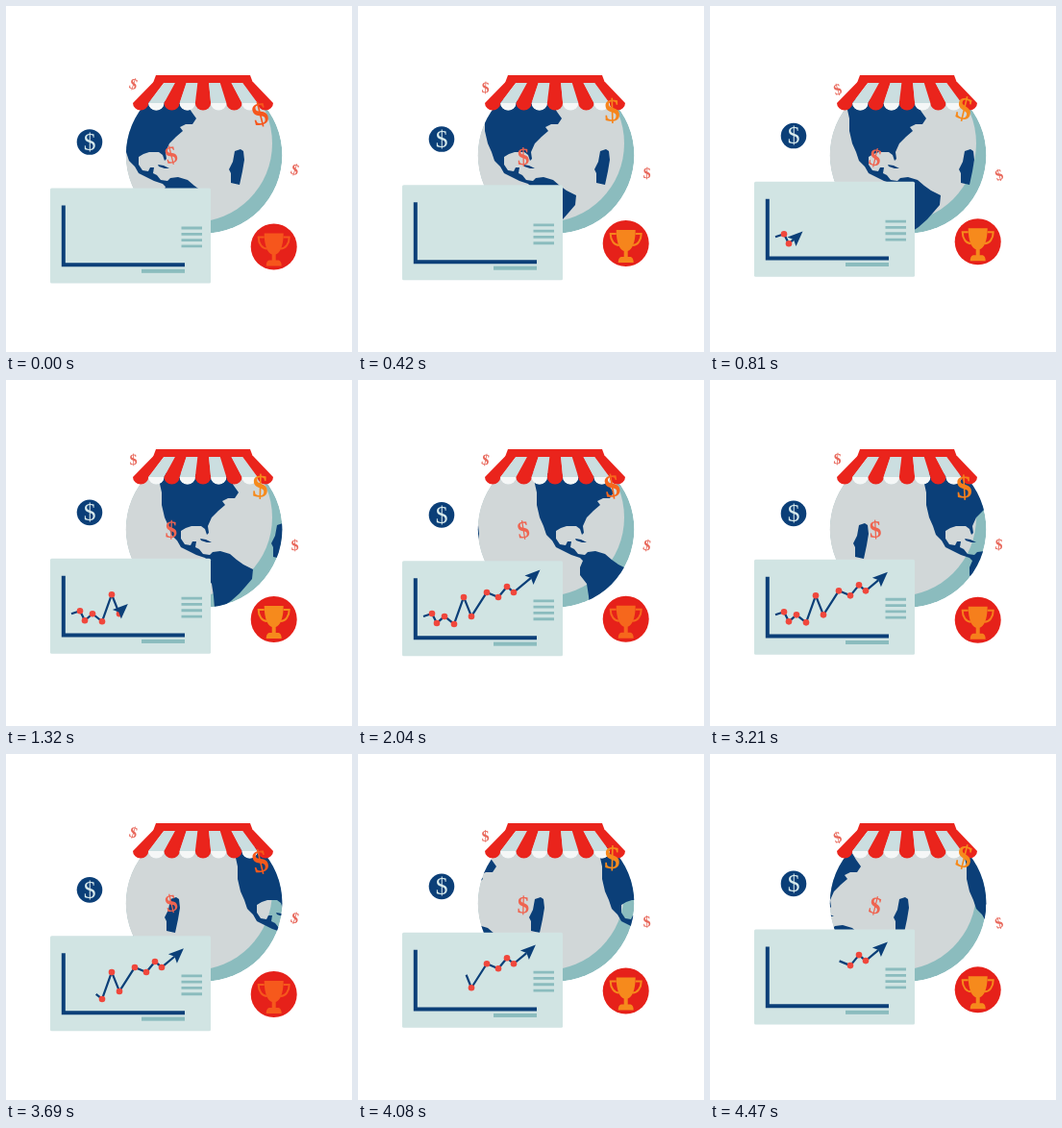
An HTML page that plays this animation: 360x360 px, repeating every 4.5 s.

```html
<!DOCTYPE html>
<html lang="en">
<head>
<meta charset="utf-8">
<title>Global store growth</title>
<style>
  html, body { margin: 0; width: 100%; height: 100%; overflow: hidden; background: #fff; }
  svg { display: block; width: 100vw; height: 100vh; }
  text { font-family: "Liberation Serif", "Noto Serif", serif; text-anchor: middle; }
  .ink { fill: #0b3f78; }
  .teal { fill: #8bbcbe; }
</style>
</head>
<body>
<svg viewBox="0 0 360 360">
  <defs>
    <clipPath id="disc"><circle cx="206.1" cy="155.200" r="81.300"/></clipPath>
    <g id="land">
      <path d="M113 96 L116 108 118 117 118 130 121 143 125 152 128 161 134 167 138 174 146 178 154 182 163 185 166 188
        163 195 163 203 170 212 172 225 173 238 181 236 190 230 199 222 206 214 212 207 213 197 203 192 196 187
        189 181 179 178 171 179 168 182 161 181 157 176 153 174 154 168 150 168 148 172 142 171 138 165 138 157
        143 154 149 152 159 152 163 155 165 161 167 159 166 152 170 143 177 136 184 130 181 126 187 123 194 123
        198 117 193 110 187 100Z"/>
      <path d="M158 165l6 1 6 3-5 0-6-2Z"/>
      <path d="M238 151l6-2 3 2 1 9-2 12-3 14-9-2 0-10-2-4 4-8Z"/>
    </g>
  </defs>

  <g clip-path="url(#disc)">
    <circle class="teal" cx="206.1" cy="155.200" r="81.300"/>
    <circle cx="195" cy="143" r="82" fill="#d1d7d8"/>
    <g id="strip" class="ink"><use href="#land"/><use href="#land" x="-190"/></g>
  </g>
  <g id="awning"></g>

  <g id="card">
    <rect x="46" width="167" height="99" rx="1.5" fill="#d1e4e3"/>
    <path d="M59.8 18V79.800H186" fill="none" stroke="#0b3f78" stroke-width="4"/>
    <rect class="teal" x="141" y="84.300" width="45" height="4"/>
    <path d="M182.500 41.500h21.500m-21.500 6.300h21.500m-21.500 6.300h21.500m-21.500 6.300h21.500" stroke="#8bbcbe" stroke-width="2.800"/>
    <g transform="translate(0 .6)">
      <polyline id="line" fill="none" stroke="#0b3f78" stroke-width="2.200" stroke-linejoin="round"/>
      <g id="dots" fill="#f0473c"></g>
      <path id="head" class="ink" d="M9.500 -8.500 L2.500 7 0 0 -6.500 -2.500Z"/>
    </g>
  </g>

  <g id="badge"><circle class="ink" r="13.300"/></g>
  <g id="prize">
    <circle r="24" fill="#e6211a"/>
    <g id="cup">
      <path d="M-10 -14H10C10 0 6 7 2 8V14H5Q8 15 8 20H-8Q-8 15 -5 14H-2V8C-6 7 -10 0 -10 -14Z"/>
      <path d="M-10 -10H-16C-16 -3 -12 2 -7 2M10 -10H16C16 -3 12 2 7 2" fill="none" stroke="currentColor" stroke-width="2"/>
    </g>
  </g>
  <g id="coins"></g>
</svg>
<script>
const LOOP = 4500, STEP = 30, BOB = 1800, LEAD = 130;
const $ = id => document.getElementById(id);

function add(parent, tag, attrs, text) {
  const el = document.createElementNS('http://www.w3.org/2000/svg', tag);
  for (const k in attrs) el.setAttribute(k, attrs[k]);
  if (text) el.textContent = text;
  return parent.appendChild(el);
}
const move = (el, x, y, turn = 0) =>
  el.setAttribute('transform', `translate(${x} ${y}) rotate(${turn})`);
const dollar = (parent, size, fill, weight = 400) =>
  add(parent, 'text', { y: size * 0.32, 'font-size': size, 'font-weight': weight, fill }, '$');

// Striped awning with scalloped flaps
const topX = i => 153.5 + i * 103.5 / 9, lowX = i => 132 + i * 146 / 9;
for (let i = 0; i < 9; i++) {
  const red = i % 2 === 0, a = lowX(i), b = lowX(i + 1);
  const flap = `A8.1 7.5 0 0 1 ${a} 101`;
  add($('awning'), 'path', {
    d: `M${topX(i)} 79H${topX(i + 1)}L${b} 101${flap}Z`, fill: red ? '#ea241c' : '#cbdee0'
  });
  if (!red) add($('awning'), 'path', { d: `M${a} 101H${b}${flap}Z`, fill: '#f5f7f7' });
}
add($('awning'), 'path', { d: 'M156 72H254L257 80H153Z', fill: '#ea241c' });

// Chart, in card coordinates
const pts = [[68, 57], [77, 54], [82, 64], [90, 57], [100, 65], [110, 37], [118, 57],
  [134, 32], [146, 37], [155, 26], [162, 32], [180, 17]];
const at = [0];
for (let i = 1; i < pts.length; i++)
  at[i] = at[i - 1] + Math.hypot(pts[i][0] - pts[i - 1][0], pts[i][1] - pts[i - 1][1]);
const total = at[at.length - 1];
$('line').setAttribute('points', pts.join(' '));
const dots = pts.slice(1, -1).map(([cx, cy]) => add($('dots'), 'circle', { cx, cy, r: 3.3 }));

function pointAt(len) {
  let i = 1;
  while (i < at.length - 1 && at[i] < len) i++;
  const k = (len - at[i - 1]) / (at[i] - at[i - 1]);
  return [0, 1].map(n => pts[i - 1][n] + k * (pts[i][n] - pts[i - 1][n]));
}

dollar($('badge'), 25.5, '#d9ebec');

// x, middle y, bob, turn, size, colour
const coins = [
  [132.7, 84, -3, 18, 16, '#e8675a'],
  [300.7, 173, -3, 18, 16, '#e8675a'],
  [172, 156.5, -1.5, -14, 25, '#ef6450'],
  [264.5, 110, 3, -14, 33, 'currentColor']
].map(([x, y, bob, turn, size, fill]) => {
  const g = add($('coins'), 'g', {});
  dollar(g, size, fill, 700);
  return { g, x, y, bob, turn };
});

const clamp = (v, max = total) => Math.min(max, Math.max(0, v));
const wave = t => Math.cos(2 * Math.PI * t / BOB);

function draw(t) {
  const c = wave(t), early = wave(t + LEAD);
  move($('strip'), t / 30, 0);
  move($('card'), 0, 186 + 3.5 * c);
  move($('badge'), 87, 138.2 + 3.3 * c);
  move($('prize'), 278.7, 248 + 2.8 * early);
  for (const k of coins) move(k.g, k.x, k.y + k.bob * early, k.turn * c);

  const orange = `rgb(246 ${Math.round(138 - 52 * Math.max(0, c))} 28)`;
  $('cup').style.color = $('cup').style.fill = $('coins').style.color = orange;

  // The arrow runs out to its full reach, then settles back a little
  const from = clamp((t - 3377) * 0.115);
  const to = clamp((t - 600) * 0.13) - clamp((t - 2040) * 0.02, 6);
  const shown = to > from;
  $('line').style.visibility = $('head').style.visibility = shown ? 'visible' : 'hidden';
  $('line').setAttribute('stroke-dasharray', `0 ${from} ${to - from} 999`);
  move($('head'), ...pointAt(to));
  dots.forEach((d, i) => {
    const on = shown && at[i + 1] > from && at[i + 1] < to + 3;
    d.style.visibility = on ? 'visible' : 'hidden';
  });
}

const start = performance.now();
function tick() {
  const t = (performance.now() - start) % LOOP;
  draw(Math.floor(t / STEP) * STEP);
  requestAnimationFrame(tick);
}
tick();
</script>
</body>
</html>
```
